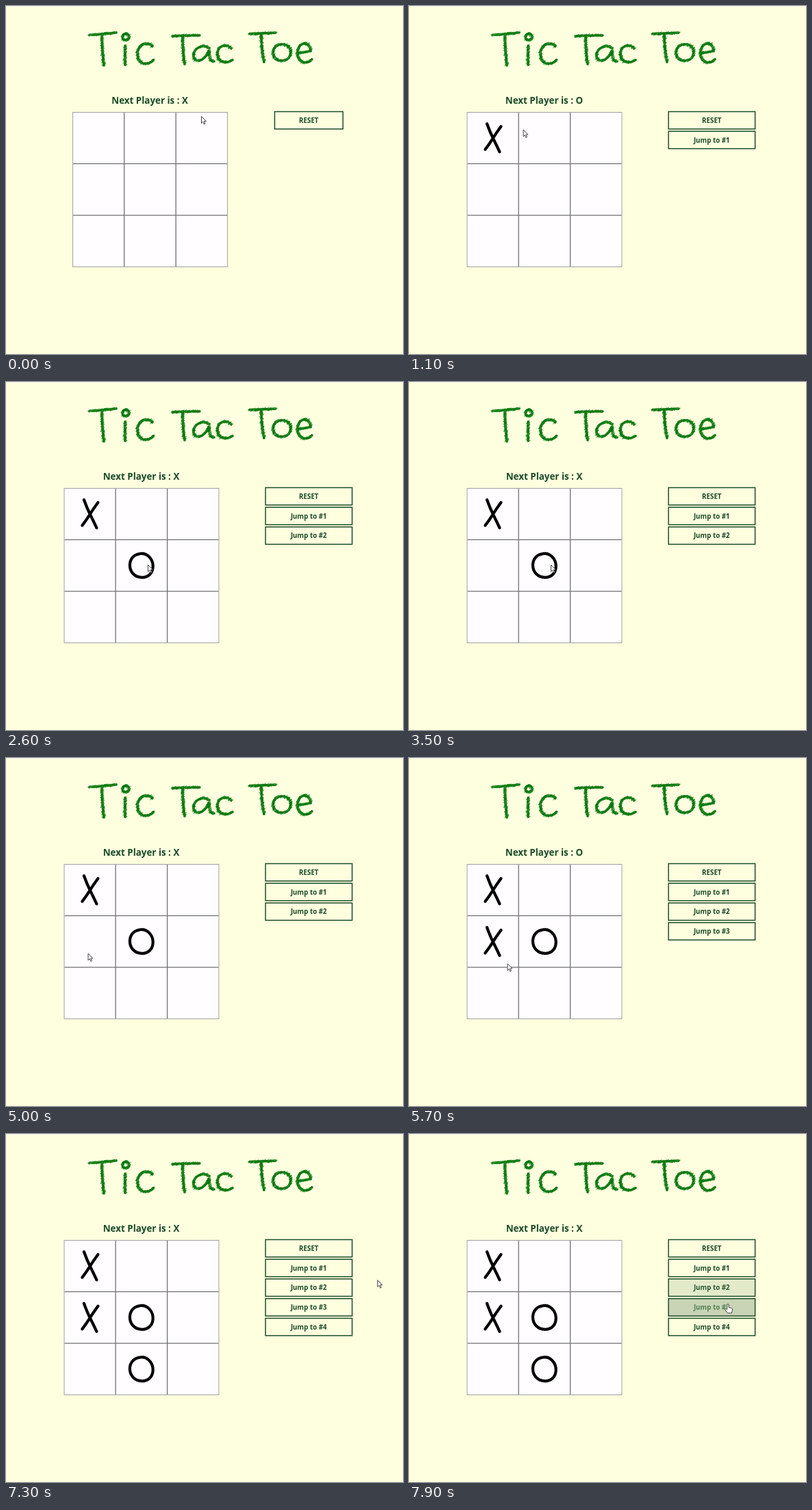
An HTML page for the animation above (8 s loop, 580 px wide and 509 px high).

```html
<!DOCTYPE html>
<html lang="en">
<head>
<meta charset="utf-8">
<title>Tic Tac Toe</title>
<style>
html, body { margin: 0; width: 100%; height: 100%; overflow: hidden; background: #feffdf; }
svg { display: block; width: 580px; height: 509px; }
text { font-family: "Open Sans", "Noto Sans", sans-serif; font-weight: 700; text-anchor: middle; fill: #1a4a26; }
#status { font-size: 13.4px; }
.button text { font-size: 9.8px; }
.button rect { stroke: #1d4c2b; stroke-width: 1.5; }
.mark { fill: none; stroke: #000; stroke-width: 4.2; stroke-linecap: round; }
#title path { fill: none; stroke-linecap: round; }
#arrow, #hand { fill: #fff; stroke: #444; stroke-width: 1; stroke-linejoin: round; }
</style>
</head>
<body>
<svg viewBox="0 0 580 509">
  <rect width="580" height="1" fill="#f8f8ee"/>
  <g id="title"></g>
  <text id="status" y="143"></text>
  <g id="board">
    <rect x=".5" y=".5" width="226" height="226" fill="#fffdff" stroke="#a0a09c"/>
    <path d="M75.6 1V226M151.1 1V226M1 75.6H226M1 151.1H226" stroke="#707074" stroke-width="1.3"/>
    <g id="marks"></g>
  </g>
  <g id="buttons"></g>
  <path id="arrow" d="M.5 .5V10.4L2.8 8.2L4.4 12L6 11.2L4.4 7.6H7.4Z"/>
  <path id="hand" d="M-1.2 8V1Q0 -.8 1.2 1V5.2L5.6 6.3Q6.8 6.8 6.6 8.6L5.4 13.4H-.6L-4.3 8.6Q-4.2 6.8 -2.8 7.3Z"/>
</svg>
<script>
const LOOP = 8000;
const $ = id => document.getElementById(id);

function add(parent, tag, attrs) {
  const el = document.createElementNS("http://www.w3.org/2000/svg", tag);
  for (const key in attrs) el.setAttribute(key, attrs[key]);
  parent.append(el);
  return el;
}

// Crayon lettering: short slanted strokes scattered along each letter's spine
const letters = [
  "M122 42.5Q142 41 161 39", "M140 42Q140 65 143 87",
  "M175 40.5C181 40 182 50 175 50C168 50 169 40 175 40.5", "M174 58L174 86",
  "M214 59C206 50 192 57 192 70C192 86 208 88 215 79",
  "M243 44Q263 43 283 43", "M258 45Q258 66 261 85",
  "M297 62C288 54 274 62 274 72C274 83 288 84 297 65C297 75 297 81 304 81",
  "M329 62C320 53 308 60 309 70C309 83 322 85 331 79",
  "M356 40.5Q376 40 394 39", "M373 41Q373 62 377 82",
  "M402 56C386 57 386 80 403 80C420 80 421 55 402 56",
  "M426 69L445 66C445 52 428 50 426 67C425 84 440 86 447 78"
];
let seed = 7;
const random = () => (seed = seed * 16807 % 2147483647) / 2147483647;
const jitter = size => (random() - .5) * size;

for (const d of letters) {
  const spine = add($("title"), "path", { d, stroke: "#178019", "stroke-width": 3.6 });
  const length = spine.getTotalLength();
  const shades = { "#0b7510": "", "#1c881e": "", "#6db465": "" };
  for (let s = 0; s < length; s += .45) {
    const p = spine.getPointAtLength(s);
    const r = random();
    const shade = Object.keys(shades)[r < .55 ? 0 : r < .88 ? 1 : 2];
    const w = .6 + random() * 1.4;
    shades[shade] += `M${p.x - w + jitter(3)} ${p.y + w * .6 + jitter(3)}l${2 * w} ${-1.2 * w}`;
  }
  for (const stroke of Object.keys(shades).reverse())
    add($("title"), "path", { d: shades[stroke], stroke, "stroke-width": .8 });
}

const shapes = {
  X: "M-8.5 -20.5Q-4 -8 1 2T10 20.5M12 -16.5Q5 -7 0 1T-11 17",
  O: "M-3 -17C8 -19.5 17 -9.5 16.8 1.5C16.5 12.5 9 17.5 1 17.5C-10 17.5 -17 9.5 -17 -.5C-17 -9.5 -11 -16 -3 -17Z"
};
const moves = [[800, 0], [2000, 4], [5300, 3], [6800, 7]].map(([at, cell], i) => ({
  at,
  el: add($("marks"), "path", {
    class: "mark",
    d: shapes["XO"[i % 2]],
    transform: `translate(${37.9 + cell % 3 * 75.5} ${37.8 + Math.floor(cell / 3) * 75.5})`
  })
}));

const buttons = ["RESET", "Jump to #1", "Jump to #2", "Jump to #3", "Jump to #4"].map((label, i) => {
  const el = add($("buttons"), "g", { class: "button" });
  const y = 154.5 + i * 28.75;
  const box = add(el, "rect", { y, height: 25.4 });
  const text = add(el, "text", { x: 442.3, y: y + 16.3 });
  text.textContent = label;
  return { el, box, text };
});

// Pointer path: time, x, y
const path = [
  [0, 285, 161], [150, 285, 161], [600, 128, 193], [850, 128, 193], [1100, 166.5, 180.5],
  [1800, 207, 267], [4600, 207, 267], [4800, 100, 291], [5000, 119.5, 285.5], [5450, 119.5, 285.5],
  [6100, 191.5, 330], [6850, 191.5, 330], [7350, 552, 210], [7600, 475, 218], [7900, 466, 248.5], [8000, 466, 248.5]
];
const clamp = v => Math.max(0, Math.min(1, v));
const ease = v => v * v * (3 - 2 * v);
const mix = (a, b, k) => a + (b - a) * k;
const mixColor = (a, b, k) => `rgb(${a.map((v, i) => Math.round(mix(v, b[i], k)))})`;

function pointer(t) {
  const i = path.findIndex(p => p[0] > t);
  const [t0, x0, y0] = path[i - 1], [t1, x1, y1] = path[i];
  const k = ease((t - t0) / (t1 - t0));
  return [mix(x0, x1, k), mix(y0, y1, k)];
}

function hover(i, t) {
  if (i === 2) return clamp((t - 7500) / 150) * clamp((8050 - t) / 300);
  return i === 3 ? clamp((t - 7750) / 150) : 0;
}

function draw(t) {
  const count = moves.filter(m => t >= m.at).length;
  const show = (el, on) => el.setAttribute("visibility", on ? "visible" : "hidden");
  const left = count ? 84.5 : 97.1;

  moves.forEach((m, i) => show(m.el, i < count));
  $("board").setAttribute("transform", `translate(${left} 155)`);
  $("status").setAttribute("x", left + 113);
  $("status").textContent = "Next Player is : " + "XO"[count % 2];

  const width = count ? 126.5 : 99.8;
  buttons.forEach(({ el, box, text }, i) => {
    const k = hover(i, t);
    show(el, i <= count);
    box.setAttribute("x", 442.4 - width / 2);
    box.setAttribute("width", width);
    box.setAttribute("fill", mixColor([254, 255, 223], [200, 212, 181], k));
    text.style.fill = mixColor([26, 74, 38], [82, 128, 82], k * k);
  });

  const [x, y] = pointer(t);
  const over = x > 379 && x < 506 && y > 154 && y < 295 && t > 7400;
  for (const id of ["arrow", "hand"]) {
    $(id).setAttribute("transform", `translate(${x} ${y})`);
    show($(id), over === (id === "hand"));
  }
}

function tick() {
  draw(performance.now() % LOOP);
  requestAnimationFrame(tick);
}
tick();
</script>
</body>
</html>
```
